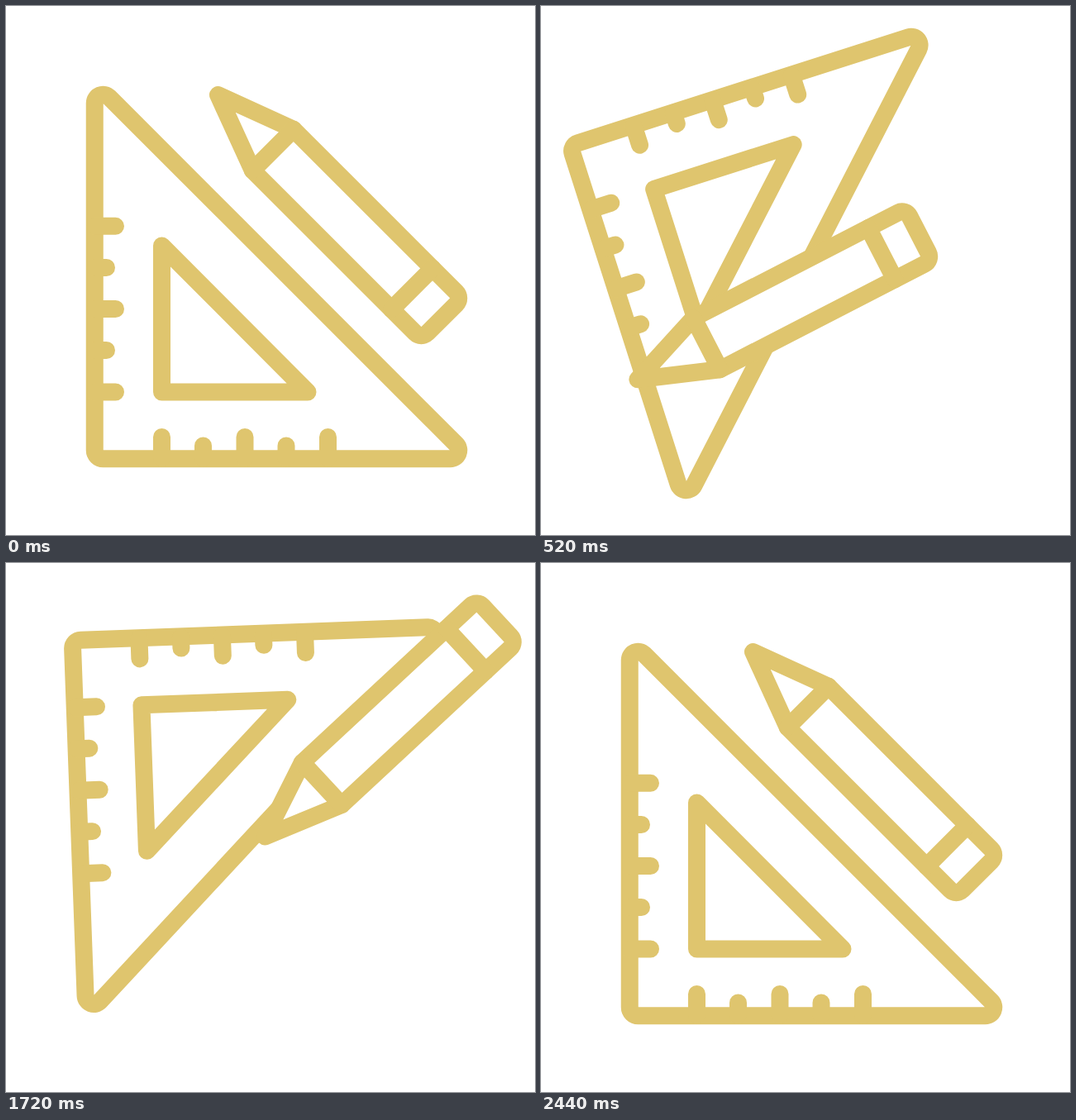
An HTML page for the animation above (3.24 s loop, 640x640 px).

```html
<!DOCTYPE html>
<html lang="en">
<head>
<meta charset="utf-8">
<title>Set square and pencil</title>
<style>
  html, body { margin: 0; width: 100%; height: 100%; overflow: hidden; background: #fff; }
  svg { display: block; width: 100vw; height: 100vh; }
  g, #line { fill: #fff; stroke: #dfc56e; stroke-width: 21; stroke-linecap: round; stroke-linejoin: round; }
</style>
</head>
<body>
<svg viewBox="0 0 640 640">
  <g id="square">
    <path d="M107.25 117.5A10.25 10.25 0 0 1 124.75 110.25L544.75 530.25A10.25 10.25 0 0 1 537.5 547.75H117.5A10.25 10.25 0 0 1 107.25 537.5Z"/>
    <path d="M188.5 290V467H365Z"/>
    <path d="M108 266.3H132.5M108 316.5H121.5M108 366.5H132.5M108 416.5H121.5M108 467H132.5"/>
    <path d="M188.5 547V521.5M238.5 547V532M289 547V521.5M339 547V532M389.5 547V521.5"/>
  </g>
  <path id="line"/>
  <g id="pencil">
    <path d="M256.5 107.5L347.8 149.3L544.7 346.2A10.25 10.25 0 0 1 544.7 360.7L509.7 395.7A10.25 10.25 0 0 1 495.2 395.7L298.3 198.8Z"/>
    <path d="M347.8 149.3L298.3 198.8M516 317.5L466.5 367"/>
  </g>
</svg>
<script>
const LOOP = 3240, STEP = 40, LAST = 2440;
const RETURN = 1680;                              // both tools rest until then
const START = [-126.7, 129.7], END = [64, -64];   // pencil offsets of the drawn stroke
const HOME = [256, 399];                          // pencil tip after a quarter turn, before the offset
const [square, line, pencil] = ['square', 'line', 'pencil'].map(id => document.getElementById(id));

const clamp = v => Math.min(1, Math.max(0, v));
const mix = (a, b, k) => a.map((v, i) => v + (b[i] - v) * k);

// Progress from one time to another along cubic-bezier(.39, 0, .495, 1)
function ease(t, from, to) {
  const u = clamp((t - from) / (to - from));
  let lo = 0, hi = 1;
  for (let i = 0; i < 30; i++) {
    const s = (lo + hi) / 2;
    const x = 3 * (1 - s) ** 2 * s * .39 + 3 * (1 - s) * s * s * .495 + s ** 3;
    if (x < u) lo = s; else hi = s;
  }
  return u === 0 || u === 1 ? u : lo * lo * (3 - 2 * lo);
}

function place(el, [x, y], angle, cx, cy) {
  el.setAttribute('transform', `translate(${x} ${y}) rotate(${angle} ${cx} ${cy})`);
}

function draw(t) {
  const back = t > RETURN;
  const turn = back ? 1 - ease(t, 1640, 2440) : ease(t, 0, 800);
  const drawn = ease(t, 750, 1536);
  const erased = ease(t, 1480, 1690);

  // The set square returns on a slightly bowed path.
  const bow = back ? 4 * turn * (1 - turn) : 0;
  place(square, [-4.1 * turn - 3.6 * bow, -22.4 * turn - 2.9 * bow], 90 * turn, 320, 320);

  const shift = mix(START, END, drawn);
  place(pencil, shift.map(v => v * turn), -90 * turn, 402, 253.5);

  const visible = t >= 800 && !back;
  line.style.display = visible ? '' : 'none';
  if (visible) {
    const at = offset => offset.map((v, i) => v + HOME[i]).join(' ');
    line.setAttribute('d', `M${at(mix(START, shift, erased))}L${at(shift)}`);
  }
}

function tick() {
  const t = performance.now() % LOOP;
  draw(Math.min(LAST, Math.floor(t / STEP) * STEP));
  requestAnimationFrame(tick);
}
tick();
</script>
</body>
</html>
```
